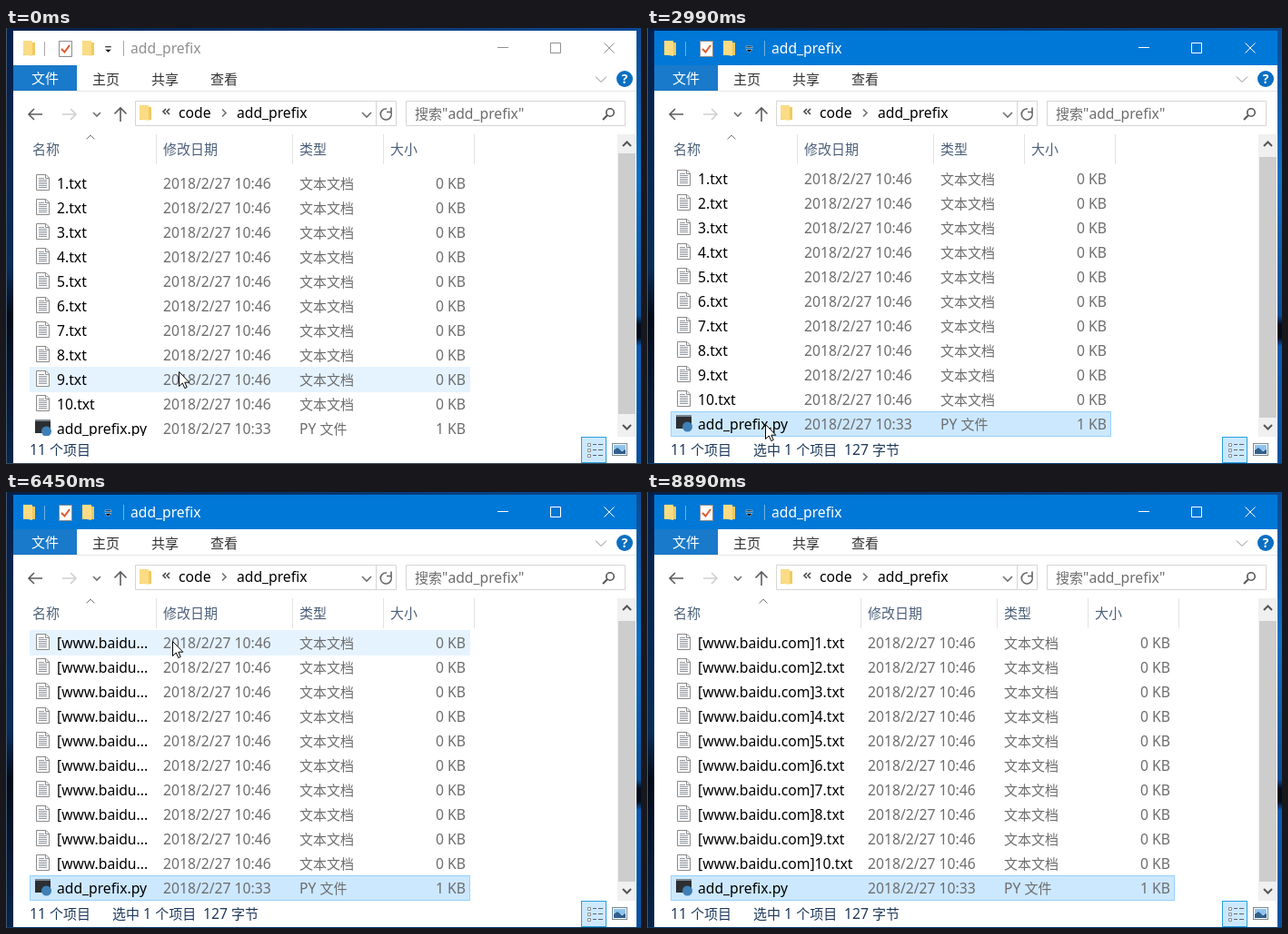
An HTML page for the animation above (9420 ms loop, 699 by 480 pixels).

```html
<!DOCTYPE html>
<html lang="zh-CN">
<head>
<meta charset="utf-8">
<title>add_prefix</title>
<style>
html, body { margin: 0; width: 100%; height: 100%; overflow: hidden; background: #04142a; }
svg { display: block; }
text { font: 15.7px "Noto Sans", "Noto Sans CJK SC", "Noto Sans CJK", sans-serif; white-space: pre; }
.cjk { font-size: 15px; }
.line { fill: none; stroke-width: 1; }
.bold { fill: none; stroke-width: 2; }
.dim { fill: #6d6d6d; }
.head text { fill: #4c607a; }
.head path { stroke: #e2e2e2; }
.status { fill: #1e395b; }
#bar { fill: #fff; }
#title { fill: #8f8f8f; }
.chrome { stroke: #8f8f8f; }
.sep { stroke: #a8a8a8; }
#selected { fill: #d9d9d9; }
#edge { fill: #3c4654; }
.active #bar { fill: #0078d7; }
.active #title { fill: #fff; }
.active .chrome { stroke: #fff; }
.active .sep { stroke: #6fb3e8; }
.active #selected { fill: #cce8ff; stroke: #99d1ff; }
.active #edge { fill: #0b3c69; }
</style>
</head>
<body>
<svg id="stage" width="699" height="480" viewBox="0 0 699 480">
  <defs>
    <linearGradient id="top">
      <stop offset="0" stop-color="#04204a"/>
      <stop offset="1" stop-color="#0a4a94"/>
    </linearGradient>
    <linearGradient id="left" x2="0" y2="1">
      <stop offset="0" stop-color="#04204a"/>
      <stop offset=".55" stop-color="#062c58"/>
      <stop offset=".66" stop-color="#020a18"/>
      <stop offset="1" stop-color="#06264c"/>
    </linearGradient>
    <linearGradient id="right" x2="0" y2="1">
      <stop offset="0" stop-color="#0a4a94"/>
      <stop offset=".34" stop-color="#1070c4"/>
      <stop offset=".66" stop-color="#0a4e96"/>
      <stop offset=".68" stop-color="#020c1c"/>
      <stop offset=".71" stop-color="#020c1c"/>
      <stop offset=".73" stop-color="#0b5cb0"/>
      <stop offset="1" stop-color="#0a50a0"/>
    </linearGradient>
    <g id="folder">
      <path d="M0 1H10V3H13V17H0Z" fill="#efca62"/>
      <path d="M0 1H10V18L0 16Z" fill="#fbdc84"/>
    </g>
    <g id="doc" class="line">
      <path d="M.5.5H11L14.5 4V17.5H.5Z" fill="#fff" stroke="#8a8a8a"/>
      <path d="M10.5 1V4.5H14" stroke="#8a8a8a"/>
      <path d="M3 4.5H9M3 6.5H12M3 8.5H12M3 10.5H12M3 12.5H12M3 14.5H12" stroke="#8f969c"/>
    </g>
    <g id="script">
      <rect width="17" height="15" fill="#2b2f33"/>
      <rect width="17" height="2" fill="#7d858c"/>
      <circle cx="12.5" cy="13" r="5.5" fill="#3f7fb5"/>
    </g>
    <clipPath id="view"><rect y="150" width="699" height="299"/></clipPath>
  </defs>

  <rect width="699" height="480" fill="url(#top)"/>
  <rect width="8" height="480" fill="url(#left)"/>
  <rect x="694" width="5" height="480" fill="url(#right)"/>
  <rect width="1" height="480" fill="#45556b"/>
  <rect x="8" y="3" width="686" height="476" fill="#fff"/>
  <rect id="edge" x="1" y="479" width="698" height="1"/>

  <!-- title bar -->
  <rect id="bar" x="8" y="3" width="686" height="38"/>
  <use href="#folder" x="19" y="13"/>
  <use href="#folder" x="84" y="13"/>
  <path class="line sep" d="M42.5 15V31M129.5 14V31"/>
  <path class="line" d="M58.5 14.5H72.5V31.5H58.5Z" style="fill:#fff" stroke="#8d8d8d"/>
  <path class="bold" d="M61 23L64.5 26.5L70 19" stroke="#e0592a"/>
  <path d="M109 20H116V21.5H109ZM109 23.5H116L112.5 27Z" stroke="#fff" stroke-width=".5"/>
  <text id="title" x="137" y="28">add_prefix</text>
  <path class="line chrome" d="M541 21.5H553M599.5 16.5H610.5V27.5H599.5ZM658.5 16.5L669.5 27.5M669.5 16.5L658.5 27.5"/>

  <!-- ribbon -->
  <rect x="8" y="41" width="70" height="28" fill="#1979ca"/>
  <path class="line" d="M8 69.5H694" stroke="#e4e5e6"/>
  <g id="tabs"></g>
  <path class="line" d="M649 53.5L655 59.5L661 53.5" stroke="#8a8a8a"/>
  <circle cx="681" cy="56" r="9" fill="#0a6fc2"/>
  <text x="681" y="61" text-anchor="middle" fill="#fff" style="font-size:14px;font-weight:700">?</text>

  <!-- address bar -->
  <g class="line" style="stroke-width:1.6">
    <path d="M40 95H25M31 89L25 95L31 101M126 103V88M119.5 94.5L126 88L132.5 94.5" stroke="#5c5c5c"/>
    <path d="M62 95H77M71 89L77 95L71 101" stroke="#d0d0d0"/>
    <path d="M96 93L100 97L104 93M392 93L397 98L402 93M238 89.5L242 93.5L238 97.5" stroke="#707070"/>
    <path d="M176 89L173 92L176 95M180 89L177 92L180 95" stroke="#444"/>
    <path d="M423.5 92A6 6 0 1 1 419 89M424 87.5V92.5H419" stroke="#666"/>
    <circle cx="665" cy="93" r="4.2" stroke="#555"/>
    <path d="M662 96L657 101" stroke="#555" stroke-width="2"/>
  </g>
  <path class="line" d="M142.5 80.5H429.5V107.5H142.5ZM407.5 81V107M440.5 80.5H681.5V107.5H440.5Z" stroke="#d5d5d5"/>
  <use href="#folder" x="147" y="84"/>
  <g id="address"></g>

  <!-- file list -->
  <rect id="headHover" x="8" y="117" height="33" fill="#d9ebf9"/>
  <g class="head">
    <g id="nameHead"></g>
    <path id="sort" class="line" d="M-4.5 122.5L0 118L4.5 122.5" style="stroke:#7a7a7a"/>
    <g id="farHead"></g>
  </g>
  <rect id="hover" x="26" height="28" fill="#e5f3ff"/>
  <rect id="selected" x="26.5" y="422.5" height="27"/>
  <g clip-path="url(#view)"><g id="rows"></g></g>

  <!-- scroll bar -->
  <rect x="673" y="117" width="20" height="333" fill="#f0f0f0"/>
  <rect id="thumb" x="674" width="19" height="287" fill="#cdcdcd"/>
  <path class="bold" d="M679 130L683.5 125.5L688 130M679 437L683.5 441.5L688 437" stroke="#555"/>

  <!-- status bar -->
  <g id="status" class="status"></g>
  <g id="picked" class="status"></g>
  <rect x="633.5" y="450.5" width="27" height="28" fill="#cce8ff" stroke="#26a0da"/>
  <path class="line" d="M640.5 457.5h3v3h-3zM640.5 463.5h3v3h-3zM640.5 469.5h3v3h-3z" stroke="#8b8f94" style="fill:#fff"/>
  <path class="line" d="M646 458.5H650M652 458.5H657M646 464.5H650M652 464.5H657M646 470.5H650M652 470.5H657" stroke="#5b6670"/>
  <rect x="667.5" y="457.5" width="16" height="13" fill="#fff" stroke="#7c8791"/>
  <rect x="669" y="459" width="13" height="6" fill="#8fc4ee"/>
  <path d="M669 469V465L673 462L678 466L682 464V469Z" fill="#2f5f8d"/>

  <g id="console">
    <rect width="668" height="463"/>
    <path d="M668 0H690V480H0V463H668Z" fill="#f0f0f0"/>
    <path class="bold" d="M674 450L679 455L684 450" stroke="#555"/>
  </g>

  <path id="arrow" d="M.5.5V16.5L4.3 13L6.8 18.6L9.2 17.5L6.8 12.2H11.8Z" fill="#fff" stroke="#000"/>
  <g id="resize">
    <path d="M-1.5 -10V10M1.5 -10V10M-7 0H7" stroke="#fff" stroke-width="3"/>
    <path d="M-1.5 -10V10M1.5 -10V10M-7 0H-2M2 0H7" stroke="#000"/>
    <path d="M-8 0L-4 -4V4ZM8 0L4 -4V4Z"/>
  </g>
</svg>
<script>
const LOOP = 9420, ROW = 27;
const CLICK = 2580, OPEN = 4680, CLOSE = 4810, GONE = 4960;
const RENAME = 5770, GRAB = 6720, WIDEN = 7220, LEAVE = 8890;

// pointer positions: time, x, y
const trail = [
  [0, 190, 378], [130, 184, 378], [270, 181, 378], [390, 178, 379], [510, 175, 380],
  [630, 173, 380], [790, 173, 381], [1060, 168, 385], [1200, 163, 390], [1330, 156, 403],
  [1450, 148, 414], [1590, 142, 420], [1710, 135, 428], [1840, 130, 433], [2860, 130, 435],
  [2990, 130, 436], [6210, 138, 402], [6330, 163, 262], [6450, 183, 164], [6570, 169, 137],
  [6720, 166, 144], [7500, 180, 153], [7620, 185, 158], [7770, 188, 155], [8050, 188, 161],
  [8200, 193, 212], [8320, 196, 258], [8470, 198, 377], [8610, 198, 390], [8740, 198, 413]
];

const $ = id => document.getElementById(id);
const set = (id, attrs) => {
  for (const key in attrs) $(id).setAttribute(key, attrs[key]);
};
const show = (id, on) => set(id, { visibility: on ? 'visible' : 'hidden' });
const move = (id, x, y) => set(id, { transform: `translate(${x} ${y})` });
const label = (x, y, s, attrs = '') =>
  `<text x="${x}" y="${y}" ${attrs}>${s.replace(/[\u4e00-\u9fff]+/g, '<tspan class="cjk">$&</tspan>')}</text>`;
const divider = x => `<path class="line" d="M${x}.5 117V150"/>`;

function row(i) {
  const script = i === 10;
  const icon = script ? '<use href="#script" x="32" y="4"/>' : '<use href="#doc" x="33" y="4"/>';
  return `<g transform="translate(0 ${i * ROW})">${icon}${label(56, 20, 'add_prefix.py', 'class="name"')}
    <g class="far dim">${label(173, 20, `2018/2/27 10:${script ? 33 : 46}`)}
    ${label(323, 20, script ? 'PY 文件' : '文本文档')}
    ${label(506, 20, script ? '1 KB' : '0 KB', 'text-anchor="end"')}</g></g>`;
}

$('tabs').innerHTML = label(28, 61, '文件', 'fill="#fff"') +
  ['主页', '共享', '查看'].map((s, i) => label(95 + 65 * i, 62, s, 'fill="#333"')).join('');
$('address').innerHTML = label(190, 99, 'code') + label(254, 99, 'add_prefix') +
  label(450, 100, '搜索"add_prefix"', 'class="dim"');
$('nameHead').innerHTML = label(29, 139, '名称');
$('farHead').innerHTML = label(173, 139, '修改日期') + label(323, 139, '类型') +
  label(423, 139, '大小') + [165, 315, 415, 515].map(divider).join('');
$('status').innerHTML = label(26, 470, '11 个项目');
$('picked').innerHTML = label(117, 470, '选中 1 个项目') + label(217, 470, '127 字节');
$('rows').innerHTML = Array.from({ length: 11 }, (_, i) => row(i)).join('');
const names = [...document.querySelectorAll('.name')].slice(0, 10);
const farCells = document.querySelectorAll('.far');

function fileName(i, t) {
  if (t < RENAME) return `${i + 1}.txt`;
  return t < WIDEN ? '[www.baidu...' : `[www.baidu.com]${i + 1}.txt`;
}

function draw(t) {
  const [, x, y] = trail.filter(p => p[0] <= t).pop();
  const clicked = t >= CLICK;
  const top = clicked ? 152 : 157;
  const extra = t >= WIDEN ? 70 : 0;
  const present = t < LEAVE;
  const active = clicked && !(t >= OPEN && t < CLOSE);

  $('stage').setAttribute('class', active ? 'active' : '');
  move('rows', 0, top);
  set('thumb', { y: clicked ? 142 : 138 });
  names.forEach((el, i) => {
    const name = fileName(i, t);
    if (el.textContent !== name) el.textContent = name;
  });

  farCells.forEach(el => el.setAttribute('transform', `translate(${extra} 0)`));
  move('farHead', extra, 0);
  move('sort', 93 + extra / 2, 0);

  const hoverTop = top + ROW * Math.floor((y - top) / ROW);
  show('hover', present && y >= top);
  set('hover', { y: hoverTop, width: 485 + extra, height: Math.min(28, 450 - hoverTop) });
  show('headHover', present && y < 150);
  set('headHover', { width: 157 + extra });
  show('selected', clicked);
  set('selected', { width: 484 + extra });
  show('picked', clicked);

  show('console', t >= OPEN && t < GONE);
  set('console', t < CLOSE
    ? { opacity: .15, transform: 'scale(1)' }
    : { opacity: .3, transform: 'scale(1.035)' });

  const resizing = t >= GRAB && t < WIDEN;
  show('arrow', present && !resizing);
  show('resize', resizing);
  move('arrow', x, y);
  move('resize', x, y);
}

const start = performance.now();
function tick() {
  draw((performance.now() - start) % LOOP);
  requestAnimationFrame(tick);
}
tick();
</script>
</body>
</html>
```
